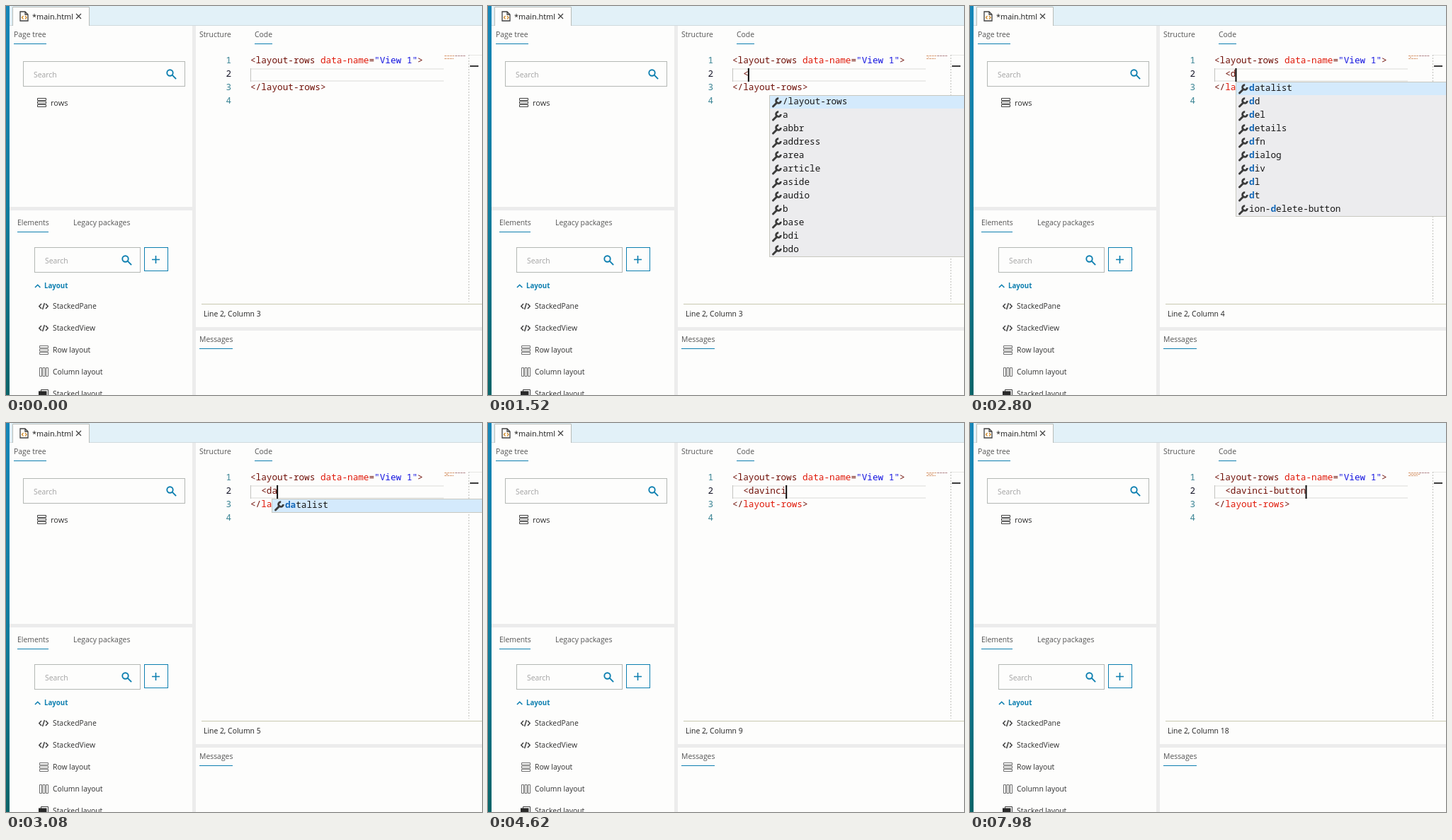
Animation of 672x550 px, one loop 8000 ms. Source, as an HTML page:

```html
<!DOCTYPE html>
<html lang="en">
<head>
<meta charset="utf-8">
<title>Code editor</title>
<style>
  html, body { margin: 0; width: 100%; height: 100%; overflow: hidden; background: #fdfdfc; }
  svg { display: block; width: 672px; height: 550px; }
  text { font: 10.4px "Open Sans", "Noto Sans", sans-serif; fill: #303030; white-space: pre; }
  .mono { font: 12.7px "Noto Sans Mono", "DejaVu Sans Mono", monospace; fill: #161616; }
  .tab { fill: #555; }
  .hint { fill: #a2a2a2; }
  .num { fill: #3a8494; text-anchor: end; }
  .tag { fill: #701008; }
  .attr { fill: #e01808; }
  .str { fill: #1414e0; }
  .hit { fill: #1468b8; font-weight: 700; }
  .line { fill: none; stroke: #404040; }
  .accent { fill: none; stroke: #0d7fb0; }
</style>
</head>
<body>
<svg id="stage" viewBox="0 0 672 550">
  <defs>
    <linearGradient id="edge" x1="0" y1="0" x2="0" y2="1">
      <stop offset="0" stop-color="#1686b8"/>
      <stop offset=".55" stop-color="#0f7c9c"/>
      <stop offset="1" stop-color="#086468"/>
    </linearGradient>
    <g id="lens" class="accent" stroke-width="1.9">
      <circle cx="0" cy="0" r="4.2"/><path d="M3.2 3.2L8.6 8.6"/>
    </g>
    <path id="rows" class="line" d="M.5 .5h12v3h-12zM.5 5h12v3h-12zM.5 9.5h12v3h-12z"/>
    <path id="cols" class="line" d="M.5 .5h3v12h-3zM5 .5h3v12h-3zM9.5 .5h3v12h-3z"/>
    <path id="code" class="line" stroke-width="1.5" d="M4 -3.5L.8 0L4 3.5M10 -3.5L13.2 0L10 3.5M8.4 -4.5L5.6 4.5"/>
    <g id="wrench" fill="none" stroke="#3c3c3c">
      <path d="M5.5 16L11 10.5" stroke-width="3" stroke-linecap="round"/>
      <path d="M13.2 4.6A3.4 3.4 0 1 0 16.4 8" stroke-width="2.8"/>
    </g>
  </defs>

  <rect width="672" height="550" fill="#fdfdfc"/>
  <rect width="672" height="27" fill="#e2f1f8"/>
  <path d="M5 27.5H672" stroke="#d0dade"/>
  <path d="M9.5 28V1.5H117.5V28" fill="#fdfdfc" stroke="#b8bcb8"/>
  <rect width="5" height="550" fill="url(#edge)"/>
  <g fill="#ececec">
    <rect x="263" y="28" width="5" height="522"/>
    <rect x="5" y="284" width="258" height="5"/>
    <rect x="268" y="454" width="404" height="5"/>
  </g>

  <path class="line" stroke-width="1.3" d="M20 8h7l4 4v9h-11zM27 8v4h4"/>
  <path d="M24.5 14l-2 2.3l2 2.3M27 14l2 2.3l-2 2.3" fill="none" stroke="#d08a28" stroke-width="1.3"/>
  <text x="37" y="18.5" style="font-size:10.9px;fill:#181818">*main.html</text>
  <path class="line" stroke-width="1.2" d="M99 11l7 7M106 11l-7 7"/>

  <g class="accent">
    <path d="M11 53.5H57M351 53.5H376M16 319.5H60M273 484.5H320"/>
    <rect x="195.5" y="341.5" width="33" height="33"/>
    <path d="M206 358.5h11M211.5 353v11" stroke-width="1.6"/>
    <path d="M41 398l3.700-3.700l3.700 3.700" stroke-width="1.6"/>
  </g>
  <g fill="none" stroke="#b4b8b4">
    <rect x="24.5" y="78.5" width="228" height="35"/>
    <rect x="40.5" y="341.5" width="149" height="35"/>
  </g>
  <use href="#lens" x="231.5" y="94.5"/>
  <use href="#lens" x="168.5" y="357.5"/>
  <use href="#rows" x="44" y="130"/>
  <use href="#code" x="46" y="424.5"/>
  <use href="#code" x="46" y="455.5"/>
  <g opacity=".75">
    <use href="#rows" x="47" y="480"/>
    <use href="#cols" x="47" y="511"/>
  </g>
  <path class="line" d="M49.5 545v-2.500h10v8"/>
  <rect x="46" y="544.5" width="11.5" height="8" fill="#282828"/>

  <g id="labels"></g>

  <path d="M345 89H618M345 106H618" stroke="#ececea" stroke-width="2"/>
  <path d="M345.500 88V107" stroke="#c4c4c0"/>
  <g id="nums"></g>
  <text class="mono tag" x="345" y="81">&lt;layout-rows <tspan class="attr">data-name</tspan>=<tspan class="str">"View 1"</tspan>&gt;</text>
  <text class="mono tag" id="typed" y="100"></text>
  <text class="mono tag" x="345" y="119">&lt;/<tspan id="closing">layout-rows</tspan>&gt;</text>

  <g stroke="#d89a70" stroke-width="1.2" stroke-dasharray="3 .8">
    <path d="M619 70.500h14M619 74.500h13"/>
    <path d="M634 70.500h15" stroke="#b08488"/>
    <path id="mini"/>
  </g>
  <path d="M653.500 69V418" stroke="#c0c0bc" stroke-dasharray="2 2"/>
  <path d="M654 69.500H672" stroke="#e6e6e4"/>
  <path d="M655 85H667" stroke="#3c3c3c" stroke-width="2"/>
  <path d="M276 421.500H672" stroke="#c8c8b0"/>
  <text id="status" x="279" y="439" style="fill:#222"></text>

  <rect id="caret" y="88" width="2" height="19" fill="#0c0c0c"/>
  <g id="popup"></g>
</svg>
<script>
const LOOP = 8000, ADV = 7.62, LEFT = 345, ROW = 19;
const WORD = "<davinci-button";
const KEYS = [1400, 2120, 2940, 3500, 3800, 4040, 4340, 4580, 5180, 6160, 6400, 6640, 7280, 7500, 7720];
// [time, column]: the status bar trails the typing
const COLUMNS = [[0, 3], [1800, 4], [2920, 5], [3300, 6], [3800, 7], [4020, 8], [4200, 9], [4880, 11],
  [5500, 12], [6640, 14], [7000, 15], [7500, 16], [7740, 17], [7960, 18]];
const TAGS = "/layout-rows a abbr address area article aside audio b base bdi bdo".split(" ");
const D_TAGS = "datalist dd del details dfn dialog div dl dt ion-delete-button".split(" ");
// the list first opens out of place, then snaps to the caret
const POPUPS = [
  { at: 0 },
  { at: 1500, x: 397, y: 126, items: TAGS, match: "" },
  { at: 1560, x: 367, y: 107, items: TAGS, match: "" },
  { at: 2180, x: 375, y: 107, items: D_TAGS, match: "d" },
  { at: 3000, x: 375, y: 107, items: ["datalist"], match: "da" },
  { at: 3500 }
];

const $ = id => document.getElementById(id);
const clamp = v => Math.max(0, Math.min(1, v));
const label = (x, y, s, cls = "", style = "") => `<text x="${x}" y="${y}" class="${cls}" style="${style}">${s}</text>`;

$("labels").innerHTML = [
  [11, 44, "Page tree", "tab"], [273, 44, "Structure", "tab"], [351, 44, "Code", "tab"],
  [16, 310, "Elements", "tab"], [95, 310, "Legacy packages", "tab"], [273, 475, "Messages", "tab"],
  [39, 101, "Search", "hint"], [55, 363.5, "Search", "hint"],
  [63, 141, "rows", "", "font-size:11px"],
  [54, 399, "Layout", "", "font-size:9.7px;font-weight:700;fill:#0d7fb0"],
  [66, 428, "StackedPane"], [66, 459, "StackedView"], [66, 490, "Row layout"],
  [66, 521, "Column layout"], [66, 552, "Stacked layout"]
].map(a => label(...a)).join("");

$("nums").innerHTML = [1, 2, 3, 4].map(n =>
  label(318, 62 + n * ROW, n, "mono num", n === 2 ? "fill:#161628" : "")).join("");

function mark(item, match) {
  const i = match ? item.indexOf(match) : -1;
  if (i < 0) return item;
  const end = i + match.length;
  return `${item.slice(0, i)}<tspan class="hit">${match}</tspan>${item.slice(end)}`;
}

function popupMarkup({ x, y, items, match }) {
  if (!items) return "";
  const rows = items.map((item, i) =>
    `<use href="#wrench" y="${i * ROW}"/>` + label(19, i * ROW + 13, mark(item, match), "mono"));
  return `<g transform="translate(${x} ${y})">
    <rect x=".5" y=".5" width="430" height="${items.length * ROW}" fill="#ececee" stroke="#c8c8c0"/>
    <rect x="1" y="1" width="429" height="${ROW - 1}" fill="#d4eafc"/>${rows.join("")}</g>`;
}

let shown;
function render(t) {
  const n = KEYS.filter(k => k <= t).length;
  const column = COLUMNS.filter(c => c[0] <= t).pop()[1];
  const popup = POPUPS.filter(p => p.at <= t).pop();
  const start = LEFT + 2 * ADV;

  $("typed").setAttribute("x", start);
  $("typed").textContent = WORD.slice(0, n);
  // an open tag above makes the closing name read as an attribute
  $("closing").setAttribute("class", n > 1 ? "attr" : "tag");
  $("status").textContent = "Line 2, Column " + column;
  $("mini").setAttribute("d", n ? `M621 72.5h${n}` : "");
  $("caret").setAttribute("x", start + n * ADV - 1);
  const fade = clamp((t - 20) / 140) - clamp((t - 980) / 140);
  $("caret").setAttribute("opacity", n ? 1 : fade);
  if (popup !== shown) {
    $("popup").innerHTML = popupMarkup(popup);
    shown = popup;
  }
}

let origin;
function tick(now) {
  origin ??= now;
  render((now - origin) % LOOP);
  requestAnimationFrame(tick);
}
render(0);
requestAnimationFrame(tick);
</script>
</body>
</html>
```
